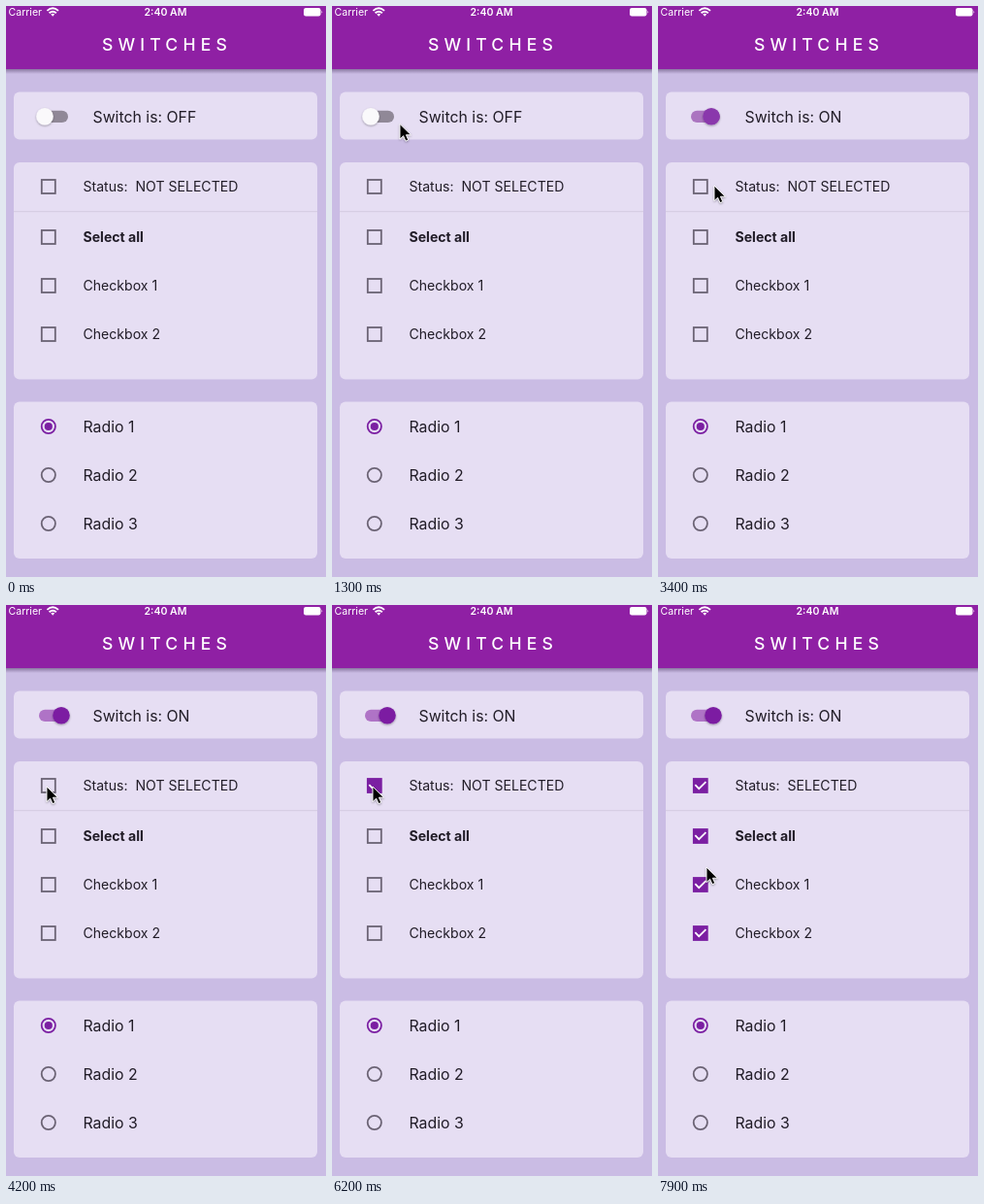
Animation, 330 px wide and 588 px high, one loop 8000 ms. Source, as an HTML page:

```html
<!DOCTYPE html>
<html lang="en">
<head>
<meta charset="utf-8">
<title>Switches</title>
<style>
html, body { margin: 0; width: 100%; height: 100%; overflow: hidden; background: #cabce4; }
svg { display: block; width: 330px; height: 588px; }
text { font: 14.08px Inter, "Open Sans", sans-serif; fill: #211c27; }
text.big { font-size: 15.84px; }
text.bold { font-weight: 700; }
text.bar { font-size: 10.56px; fill: #fff; }
text.title { font-size: 17.6px; font-weight: 500; letter-spacing: 5.15px; fill: #fff; }
.card { fill: #e6def3; }
</style>
</head>
<body>
<svg id="stage" viewBox="0 0 330 588">
  <defs>
    <linearGradient id="shade" x2="0" y2="1">
      <stop stop-color="#4b345f" stop-opacity=".5"/>
      <stop offset="1" stop-color="#4b345f" stop-opacity="0"/>
    </linearGradient>
    <filter id="drop" x="-40%" y="-40%" width="180%" height="190%">
      <feDropShadow dx="0" dy="1" stdDeviation="1" flood-opacity=".35"/>
    </filter>
  </defs>
  <rect width="330" height="588" fill="#cabce4"/>
  <rect y="65" width="330" height="5" fill="url(#shade)"/>
  <rect width="330" height="65" fill="#8f20a4"/>

  <text class="bar" x="2.5" y="10">Carrier</text>
  <g fill="none" stroke="#fff" stroke-width="1.9">
    <path d="M42.4 4.9Q48.2 -.3 54 4.9M44.6 7.3Q48.2 4 51.8 7.3"/>
    <path d="M46.3 8.6Q48.2 7 50.1 8.6L48.2 10.7Z" fill="#fff" stroke="none"/>
  </g>
  <text class="bar" x="164.5" y="10" text-anchor="middle" font-weight="600" style="font-weight:600">2:40 AM</text>
  <rect x="307" y="2" width="17.5" height="8.5" rx="2.2" fill="#fff"/>
  <path d="M325.5 4.7q1.6 1.5 0 3z" fill="#fff"/>
  <text class="title" x="99" y="46.3">SWITCHES</text>

  <rect class="card" x="8" y="88.5" width="313" height="49" rx="6"/>
  <rect class="card" x="8" y="161" width="313" height="223.5" rx="6"/>
  <rect class="card" x="8" y="407.5" width="313" height="161.5" rx="6"/>
  <path d="M8 211.7H321" stroke="#d4cbe1"/>

  <rect id="track" x="34" y="107.8" width="30" height="12.3" rx="6.15"/>
  <circle id="thumb" cy="113.8" r="8.8" filter="url(#drop)"/>
  <text class="big" id="switchText" x="89.5" y="119.5"></text>

  <text id="status" x="79.5" y="191.2"></text>
  <text class="bold" x="79.5" y="243">Select all</text>
  <text x="79.5" y="293">Checkbox 1</text>
  <text x="79.5" y="343">Checkbox 2</text>
  <g id="boxes"></g>
  <g id="radios"></g>

  <path id="cursor" d="M0 0V15.6L3.6 12.2L6 17.6L8.7 16.4L6.4 11.2H11.4Z"
        fill="#000" stroke="#fff" stroke-width=".9" filter="url(#drop)"/>
</svg>
<script>
const LOOP = 8000, PURPLE = [123, 31, 162], GREY = "#6b6374";
const $ = id => document.getElementById(id);
const clamp = v => Math.max(0, Math.min(1, v));
const mix = (a, b, p) => a + (b - a) * p;
const mixColor = (a, b, p) => `rgb(${a.map((v, i) => Math.round(mix(v, b[i], p)))})`;
const purple = `rgb(${PURPLE})`;

// Keys are [time, ...values]; values ease between neighbours.
function track(keys, t) {
  let i = 0;
  while (i < keys.length - 2 && t >= keys[i + 1][0]) i++;
  const a = keys[i], b = keys[i + 1];
  const p = clamp((t - a[0]) / (b[0] - a[0])), e = p * p * (3 - 2 * p);
  return a.slice(1).map((v, k) => mix(v, b[k + 1], e));
}

const pointer = [
  [1000, 86, 198], [1300, 70, 121.5], [1500, 70, 121.5], [2000, 62, 108],
  [2600, 62, 108], [3100, 58, 183], [3400, 58, 185], [4000, 42, 187],
  [6500, 42, 187], [7000, 44, 240], [7400, 44, 240], [7900, 50, 270]
];
const thumbX = [[2100, 40], [2400, 57], [2600, 57], [3100, 55], [3400, 55], [4000, 57]];

$("radios").innerHTML = [1, 2, 3].map(n => {
  const y = 383 + 50 * n, on = n === 1;
  return `<circle cx="43.8" cy="${y}" r="7.1" fill="none" stroke-width="1.8" stroke="${on ? purple : GREY}"/>`
    + (on ? `<circle cx="43.8" cy="${y}" r="4.1" fill="${purple}"/>` : "")
    + `<text class="big" x="79.5" y="${y + 5.7}">Radio ${n}</text>`;
}).join("");

const boxes = [[186, 6000], [238, 7200], [288, 7200], [338, 7200]].map(([y, start]) => {
  const g = document.createElementNS("http://www.w3.org/2000/svg", "g");
  g.setAttribute("transform", `translate(35.9 ${y - 7.9})`);
  g.innerHTML = `<rect/><path d="M2.4 7.1L6.3 11.1L13.5 4" fill="none" stroke="#fff"
    stroke-width="1.8" pathLength="1"/>`;
  $("boxes").append(g);
  return { frame: g.firstChild, tick: g.lastChild, start };
});

function set(el, attrs) {
  for (const k in attrs) el.setAttribute(k, attrs[k]);
}

// The border grows inward until the box is full, then the tick is drawn.
function drawBox({ frame, tick, start }, t) {
  const p = clamp((t - start) / 300), w = mix(1.8, 7.9, clamp(p * 2)), drawn = clamp(p * 2 - 1);
  set(frame, {
    x: w / 2, y: w / 2, width: 15.8 - w, height: 15.8 - w, fill: "none",
    "stroke-width": w, stroke: p ? purple : GREY
  });
  set(tick, { "stroke-dasharray": `${drawn} 2`, visibility: drawn ? "visible" : "hidden" });
}

function draw(t) {
  const [x] = track(thumbX, t), on = (x - 40) / 17;
  set($("thumb"), { cx: x, fill: mixColor([250, 249, 251], PURPLE, on) });
  set($("track"), { fill: mixColor([144, 136, 151], [175, 115, 198], on) });
  $("switchText").textContent = "Switch is: " + (t >= 2200 ? "ON" : "OFF");
  $("status").textContent = "Status:\u00a0\u00a0" + (t >= 6600 ? "SELECTED" : "NOT SELECTED");
  boxes.forEach(b => drawBox(b, t));
  set($("cursor"), {
    transform: `translate(${track(pointer, t)})`,
    visibility: t >= 1000 ? "visible" : "hidden"
  });
}

const begin = performance.now();
function tick() {
  const t = (performance.now() - begin) % LOOP;
  draw(Math.floor(t / 100) * 100);
  requestAnimationFrame(tick);
}
tick();
</script>
</body>
</html>
```
